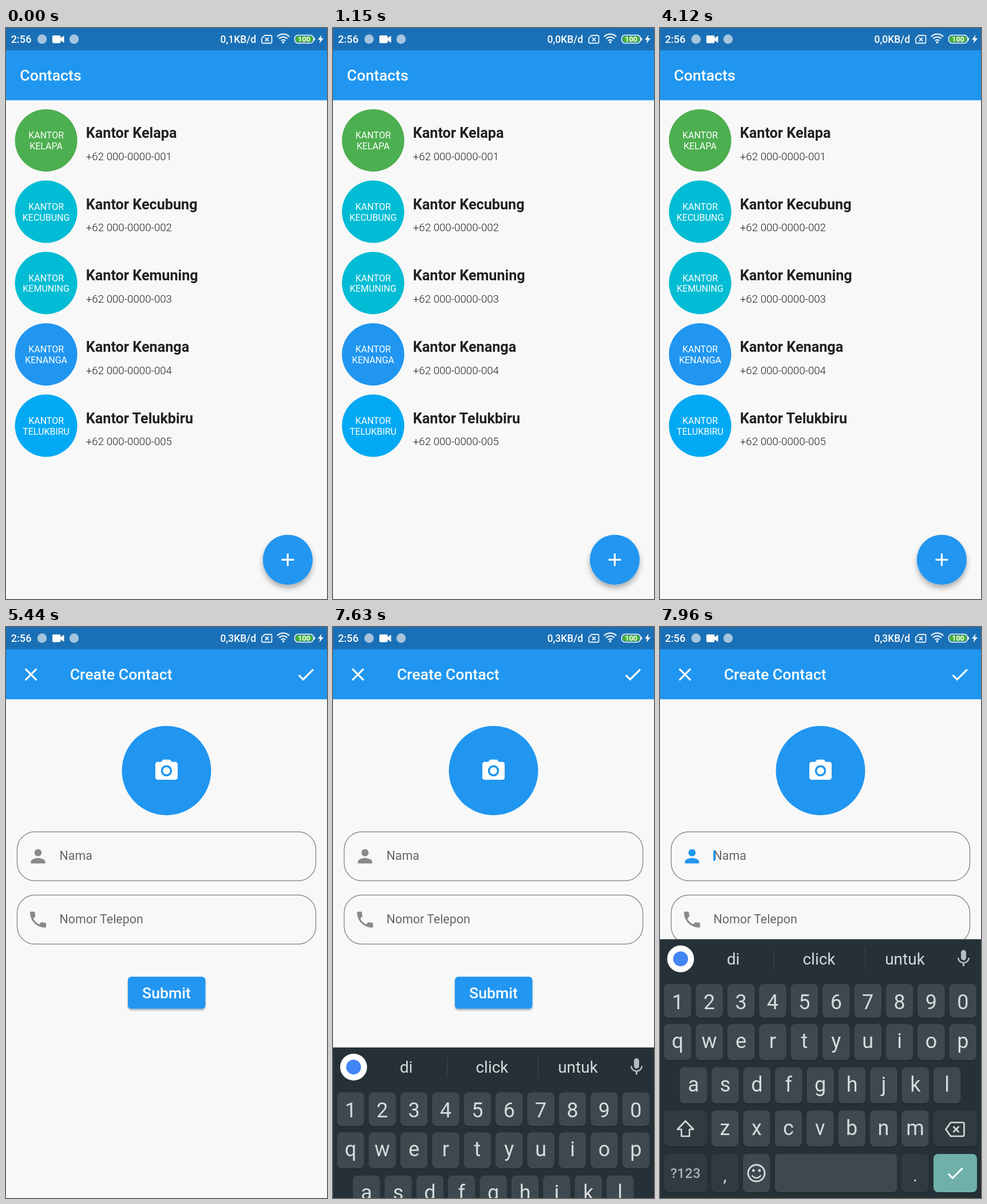
Animation of 561 by 998 pixels, one loop 8 s. Source, as an HTML page:

```html
<!DOCTYPE html>
<html lang="id">
<head>
<meta charset="utf-8">
<title>Contacts</title>
<style>
  html, body { margin: 0; width: 100%; height: 100%; overflow: hidden; background: #f8f8f8; }
  svg { display: block; width: 561px; height: 998px; font-family: Roboto, "Noto Sans", sans-serif; }
</style>
</head>
<body>
<svg id="stage" viewBox="0 0 561 998"></svg>
<script>
const LOOP = 8000;
const RATE_DROP = 210, RATE_RISE = 4450, PAGE_OPEN = 5440, KEYBOARD_SHOW = 7630;
const BLUE = '#2096f1', GREY = '#898989', KEY_TEXT = '#d6dbdd';

const ICONS = {
  close: 'M19 6.41L17.59 5 12 10.59 6.41 5 5 6.41 10.59 12 5 17.59 6.41 19 12 13.41 17.59 19 19 17.59 13.41 12z',
  check: 'M9 16.17L4.83 12l-1.42 1.41L9 19 21 7l-1.41-1.41z',
  camera: 'M9 2L7.17 4H4c-1.1 0-2 .9-2 2v12c0 1.1.9 2 2 2h16c1.1 0 2-.9 2-2V6c0-1.1-.9-2-2-2h-3.17L15 2H9z' +
    'm3 15c-2.76 0-5-2.24-5-5s2.24-5 5-5 5 2.24 5 5-2.24 5-5 5z',
  person: 'M12 12c2.21 0 4-1.79 4-4s-1.79-4-4-4-4 1.79-4 4 1.79 4 4 4z' +
    'm0 2c-2.67 0-8 1.34-8 4v2h16v-2c0-2.66-5.33-4-8-4z',
  phone: 'M6.62 10.79c1.44 2.83 3.76 5.14 6.59 6.59l2.2-2.2c.27-.27.67-.36 1.02-.24 1.12.37 2.33.57 3.57.57' +
    '.55 0 1 .45 1 1V20c0 .55-.45 1-1 1-9.39 0-17-7.61-17-17 0-.55.45-1 1-1h3.5c.55 0 1 .45 1 1' +
    ' 0 1.25.2 2.45.57 3.57.11.35.03.74-.25 1.02l-2.2 2.2z',
  mic: 'M12 14c1.66 0 3-1.34 3-3V5c0-1.66-1.34-3-3-3S9 3.34 9 5v6c0 1.66 1.34 3 3 3z' +
    'm5.3-3c0 3-2.54 5.1-5.3 5.1S6.7 14 6.7 11H5c0 3.41 2.72 6.23 6 6.72V21h2v-3.28c3.28-.48 6-3.3 6-6.72h-1.7z'
};

const text = (x, y, size, content, { weight = 400, fill = '#fff', anchor = 'start', id = '' } = {}) =>
  `<text ${id && `id="${id}"`} x="${x}" y="${y}" font-size="${size}" font-weight="${weight}" fill="${fill}" text-anchor="${anchor}">${content}</text>`;
const rect = (x, y, w, h, fill, rx = 0, extra = '') =>
  `<rect x="${x}" y="${y}" width="${w}" height="${h}" rx="${rx}" fill="${fill}" ${extra}/>`;
const circle = (x, y, r, fill, extra = '') =>
  `<circle cx="${x}" cy="${y}" r="${r}" fill="${fill}" ${extra}/>`;
const line = (d, stroke, width, extra = '') =>
  `<path d="${d}" fill="none" stroke="${stroke}" stroke-width="${width}" ${extra}/>`;
const icon = (name, cx, cy, fill, scale = 1.558, id = '') =>
  `<path ${id && `id="${id}"`} d="${ICONS[name]}" fill="${fill}" transform="translate(${cx - 12 * scale} ${cy - 12 * scale}) scale(${scale})"/>`;
const shadow = (id, dy, blur, opacity) =>
  `<filter id="${id}" x="-30%" y="-30%" width="160%" height="180%"><feDropShadow dx="0" dy="${dy}" stdDeviation="${blur}" flood-opacity="${opacity}"/></filter>`;

function statusBar() {
  const wifi = [5, 9.7, 14.4].map(r => {
    const k = r * 0.74;
    return line(`M${484.5 - k} ${26 - k}A${r} ${r} 0 0 1 ${484.5 + k} ${26 - k}`, '#e8f2fa', 2.3);
  }).join('');
  return rect(0, 0, 561, 39, '#1a70b6') +
    text(8.7, 26.3, 18.2, '2:56', { weight: 500 }) +
    circle(63, 19.5, 8.2, '#a5c5de') + circle(119, 19.5, 8.2, '#a5c5de') +
    rect(81, 13, 14.5, 13.5, '#fff', 2) + '<path d="M95 18l6.5-4.5v12.5l-6.5-4.5z" fill="#fff"/>' +
    text(374.5, 26.3, 17.5, '0,1KB/d', { weight: 500, id: 'rate' }) +
    line('M452 13H462.5a2 2 0 0 1 2 2V24.5a2 2 0 0 1-2 2H449a2 2 0 0 1-2-2V18z', '#e8f2fa', 1.8) +
    line('M453 17l6 6m0-6l-6 6', '#e8f2fa', 1.8) +
    wifi + circle(484.5, 25, 2, '#e8f2fa') +
    rect(504.5, 12.5, 33, 14, '#1a70b6', 6, 'stroke="#fff" stroke-width="1.6"') +
    rect(506.5, 14.5, 29, 10, '#45b52b', 4) + rect(538.3, 17, 1.8, 5, '#fff', 1) +
    text(521, 24, 12.5, '100', { weight: 700, anchor: 'middle' }) +
    '<path d="M551.5 12l-6.5 8.5h4.2l-1.700 6.500 7.500-9h-4.500z" fill="#fff"/>';
}

function contactList() {
  const contacts = [
    ['Kelapa', '#4caf50'], ['Kecubung', '#00bcd4'], ['Kemuning', '#00bcd4'],
    ['Kenanga', BLUE], ['Telukbiru', '#03a9f4']
  ];
  const rows = contacts.map(([name, color], i) =>
    `<g transform="translate(0 ${i * 124.67})">` +
    circle(70.1, 196.4, 54.5, color) +
    text(70.1, 193.3, 16, 'KANTOR', { anchor: 'middle' }) +
    text(70.1, 212, 16, name.toUpperCase(), { anchor: 'middle' }) +
    text(139.8, 192, 25.2, 'Kantor ' + name, { weight: 700, fill: '#212121' }) +
    text(139.8, 230.7, 18.7, '+62 000-0000-00' + (i + 1), { weight: 300, fill: '#212121' }) + '</g>').join('');
  return text(24.3, 92, 26.7, 'Contacts', { weight: 500 }) + rows +
    circle(492.4, 929.4, 43.6, BLUE, 'filter="url(#fabShadow)"') +
    line('M481.5 929.4h21.8m-10.9-10.9v21.8', '#fff', 3.1);
}

function createPage() {
  const field = (y, label) =>
    rect(19.5, y, 522, 85.7, 'none', 31, 'stroke="#8e8e96" stroke-width="1.5"') +
    text(93.5, y + 49.3, 21.4, label, { fill: '#666' });
  return icon('close', 43.6, 83, '#fff') + icon('check', 524, 83, '#fff') +
    text(111.7, 92, 26.7, 'Create Contact', { weight: 500 }) +
    circle(280.5, 251, 78, BLUE) + icon('camera', 280.5, 251.3, '#fff', 1.95) + circle(280.5, 251.3, 6.24, '#fff') +
    field(357.9, 'Nama') + icon('person', 56, 400.7, GREY, 1.558, 'person') +
    rect(93.3, 390, 3.1, 19, BLUE, 1, 'id="cursor"') +
    field(468.6, 'Nomor Telepon') + icon('phone', 56, 511.4, GREY) +
    rect(213, 611.3, 135.5, 56, BLUE, 6, 'filter="url(#buttonShadow)"') +
    text(280.5, 648.7, 26.7, 'Submit', { weight: 500, anchor: 'middle' });
}

function keyboard() {
  const key = (x, y, w, h, fill = '#3d494e') => rect(x, y + 1.5, w, h, '#1b2529', 8) + rect(x, y, w, h, fill, 8);
  const row = (letters, x0, y, h, baseline) => [...letters].map((letter, i) => {
    const x = x0 + i * 55.4;
    return key(x, y, 47.5, h) +
      text(x + 23.75, baseline, 36, letter, { fill: KEY_TEXT, anchor: 'middle' });
  }).join('');
  const words = ['di', 'click', 'untuk'].map((word, i) =>
    text(128 + i * 150, 590, 28, word, { fill: KEY_TEXT, anchor: 'middle' })).join('');
  const dark = '#303b40';
  return rect(0, 545.7, 561, 453, '#253136') +
    circle(36, 580, 23.5, '#fff') + circle(36, 580, 13, '#4285f4') +
    words + line('M199.5 562v36M358.5 562v36', '#3a464b', 1.3) +
    icon('mic', 530.5, 579.5, '#b4bcc0', 1.5) +
    row('1234567890', 7, 624, 59, 668) +
    row('qwertyuiop', 7, 694, 63, 736) +
    row('asdfghjkl', 34.8, 769.5, 63, 812) +
    row('zxcvbnm', 89.8, 845, 63, 887.5) +
    key(7, 845, 75, 63, dark) + key(478, 845, 76, 63, dark) +
    line('M44.5 863.5L30.5 878h7v12h14v-12h7z', KEY_TEXT, 2.6, 'stroke-linejoin="round"') +
    line('M508 866h21a2.5 2.5 0 0 1 2.5 2.5v19a2.5 2.5 0 0 1-2.5 2.5h-21l-8.5-12z', KEY_TEXT, 2.6, 'stroke-linejoin="round"') +
    line('M512.5 873l10 10m0-10l-10 10', KEY_TEXT, 2.6) +
    key(7, 921, 75, 67, dark) + text(44.5, 963, 24, '?123', { weight: 500, fill: '#a9b1b5', anchor: 'middle' }) +
    key(89.8, 921, 47.5, 67, dark) + text(113.5, 969, 30, ',', { fill: KEY_TEXT, anchor: 'middle' }) +
    key(145, 921, 47.5, 67) + circle(168.5, 954.5, 14.5, 'none', `stroke="${KEY_TEXT}" stroke-width="2.8"`) +
    circle(163.3, 950, 2.4, KEY_TEXT) + circle(173.7, 950, 2.4, KEY_TEXT) +
    line('M160.5 958.5q8 9 16 0', KEY_TEXT, 2.6) +
    key(200.5, 921, 214, 67) +
    key(422, 921, 47.5, 67, dark) + text(446, 969, 30, '.', { fill: KEY_TEXT, anchor: 'middle' }) +
    key(478, 921, 76, 67, '#6fb0a8') + icon('check', 516, 954.5, '#fff');
}

document.getElementById('stage').innerHTML =
  `<defs>${shadow('fabShadow', 6, 5, 0.3)}${shadow('buttonShadow', 2.5, 1.8, 0.3)}</defs>` +
  rect(0, 0, 561, 998, '#f8f8f8') + rect(0, 39, 561, 87.3, BLUE) + statusBar() +
  `<g id="list">${contactList()}</g><g id="create">${createPage()}</g><g id="keyboard">${keyboard()}</g>`;

const [rate, list, create, person, cursor, keys] =
  ['rate', 'list', 'create', 'person', 'cursor', 'keyboard'].map(id => document.getElementById(id));
const show = (node, visible) => node.setAttribute('display', visible ? 'inline' : 'none');

function render(t) {
  const speed = t < RATE_DROP ? 1 : t < RATE_RISE ? 0 : 3;
  rate.textContent = `0,${speed}KB/d`;
  show(list, t < PAGE_OPEN);
  show(create, t >= PAGE_OPEN);

  // The slide is already one screen refresh old when it is first seen.
  const tick = Math.floor((t - KEYBOARD_SHOW) / 41.25);
  const progress = Math.min(1, (tick * 41.25 + 40) / 250);
  const offset = 452.3 * (1 - progress) ** 5;
  show(keys, tick >= 0);
  keys.setAttribute('transform', `translate(0 ${tick >= 0 ? offset : 0})`);

  const focused = tick >= 1;
  person.setAttribute('fill', focused ? BLUE : GREY);
  show(cursor, focused);
}

const start = performance.now();
function frame() {
  render((performance.now() - start) % LOOP);
  requestAnimationFrame(frame);
}
frame();
</script>
</body>
</html>
```
